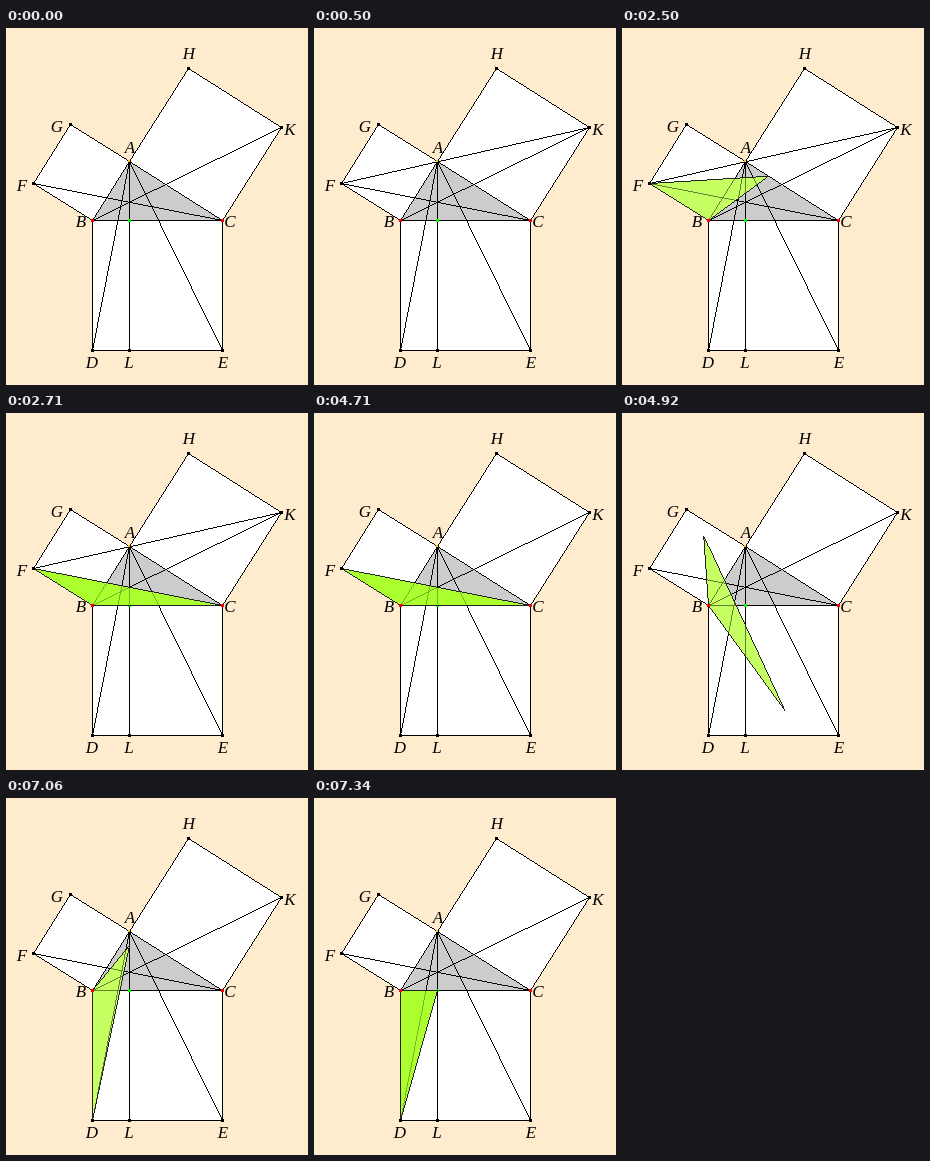
Recreate the animation shown at these times as an HTML page with a canvas. Size 302 px wide and 357 px high, loop 8 s.

```html
<!DOCTYPE html>
<html lang="en">
<head>
<meta charset="utf-8">
<title>Squares on a right triangle</title>
<style>
  html, body { margin: 0; width: 100%; height: 100%; overflow: hidden; background: #ffebcd; }
  canvas { display: block; }
</style>
</head>
<body>
<canvas id="stage" width="302" height="357"></canvas>
<script>
const ctx = document.getElementById('stage').getContext('2d');
const LOOP = 8000, STEP = 70;

const P = {
  A: [123, 133], B: [86, 192], C: [216, 192], D: [86, 322], E: [216, 322], F: [27, 155],
  G: [64, 96], H: [182, 40], K: [275, 99], L: [123, 322], foot: [123, 192]
};
const labels = {
  A: [124, 125], B: [75, 199], C: [224, 199], D: [86, 340], E: [217, 340],
  F: [16, 163], G: [51, 104], H: [183, 31], K: [284, 107], L: [123, 340]
};
const edges = 'AB BC CA AG GF FB AH HK KC BD DE EC AL AD AE BK FC'.split(' ');
const points = names => [...names].map(n => P[n]);

function fill(pts, color) {
  ctx.fillStyle = color;
  ctx.beginPath();
  pts.forEach(([x, y]) => ctx.lineTo(x + 0.5, y + 0.5));
  ctx.fill();
}

// One-pixel line without antialiasing
function line([x0, y0], [x1, y1], color = '#000') {
  const n = Math.max(1, Math.round(Math.max(Math.abs(x1 - x0), Math.abs(y1 - y0))));
  ctx.fillStyle = color;
  for (let i = 0; i <= n; i++) {
    ctx.fillRect(Math.round(x0 + (x1 - x0) * i / n), Math.round(y0 + (y1 - y0) * i / n), 1, 1);
  }
}

function dot([x, y], color) {
  ctx.fillStyle = color;
  ctx.fillRect(x - 1, y - 1, 3, 3);
}

const mix = (p, q, k) => p.map((v, i) => v + (q[i] - v) * k);

function turn([x, y], k) {
  const [bx, by] = P.B, a = k * Math.PI / 2, c = Math.cos(a), s = Math.sin(a);
  return [bx + (x - bx) * c - (y - by) * s, by + (x - bx) * s + (y - by) * c];
}

// Corners of the green triangle and whether it is moving
function greenAt(t) {
  const stepsFrom = start => Math.floor((t - start) / STEP);
  if (t < 1500) return null;
  if (t < 2500) return { pts: points('FBA'), moving: false };
  if (t < 4710) {
    const k = Math.min(1, (stepsFrom(2500) + 1) / 4);
    return { pts: [P.F, P.B, mix(P.A, P.C, k)], moving: k < 1 };
  }
  if (t < 7060) {
    const k = Math.min(1, stepsFrom(4710) / 5);
    return { pts: [turn(P.F, k), P.B, turn(P.C, k)], moving: k > 0 && k < 1 };
  }
  const k = Math.min(1, (stepsFrom(7060) + 1) * 0.24);
  return { pts: [mix(P.A, P.foot, k), P.B, P.D], moving: k < 1 };
}

function draw(t) {
  const green = greenAt(t);
  const color = green && (green.moving ? '#c5ff63' : '#adff2f');

  ctx.fillStyle = '#ffebcd';
  ctx.fillRect(0, 0, 302, 357);
  ['ABFG', 'ACKH', 'BCED'].forEach(s => fill(points(s), '#fff'));
  fill(points('ABC'), '#ccc');
  if (green) fill(green.pts, color);

  edges.forEach(e => line(...points(e)));
  if (t >= 500 && t < 4710) line(P.F, P.K);
  dot(P.foot, '#0f0');

  // A veil of the same colour dims the lines beneath
  if (green) {
    ctx.globalAlpha = green.moving ? 0.5 : 0.7;
    fill(green.pts, color);
    ctx.globalAlpha = 1;
    green.pts.forEach((p, i) => line(p, green.pts[(i + 1) % 3], '#222'));
  }

  points('DEFGHKL').forEach(p => dot(p, '#000'));
  points('BC').forEach(p => dot(p, '#f00'));
  dot(P.A, '#000');
  ctx.fillStyle = '#fc0';
  ctx.fillRect(P.A[0] - 1, P.A[1] - 1, 2, 2);

  ctx.fillStyle = '#000';
  ctx.font = 'italic 17px "Liberation Serif", serif';
  ctx.textAlign = 'center';
  for (const n in labels) ctx.fillText(n, ...labels[n]);
}

function frame() {
  draw(performance.now() % LOOP);
  requestAnimationFrame(frame);
}
frame();
</script>
</body>
</html>
```
